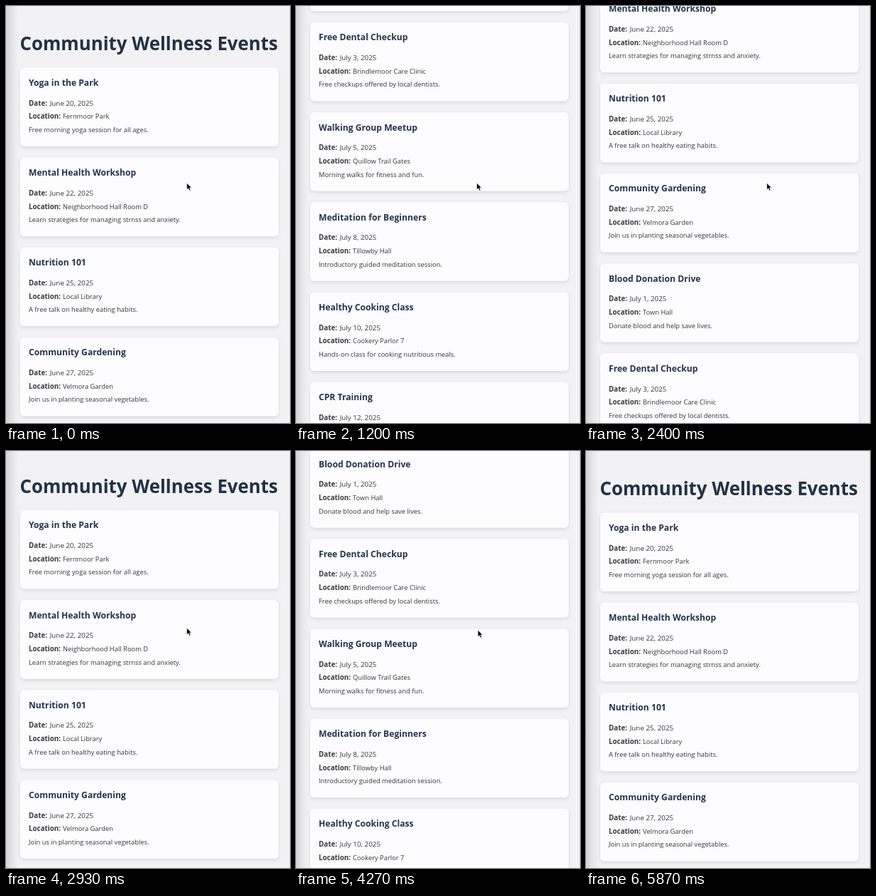
These frames come from a looping animation (400 by 585 pixels, 6470 ms). An HTML page:

```html
<!DOCTYPE html>
<html lang="en">
<head>
<meta charset="utf-8">
<title>Wellness events</title>
<style>
  html, body { margin: 0; width: 100%; height: 100%; overflow: hidden; background: #f2f1f3; }
  svg { display: block; width: 100vw; height: 100vh; }
  text { font: 9.35px "Open Sans", "Noto Sans", sans-serif; fill: #363639; }
  .title { font-size: 25.85px; font-weight: 700; fill: #223245; }
  .heading { font-size: 12.15px; font-weight: 700; fill: #22354b; }
  .label { font-size: 9.8px; font-weight: 700; fill: #3b3b3e; }
  .date { font-size: 9.85px; }
  .card { fill: #fdfcfe; filter: drop-shadow(0 2px 2.5px rgba(0, 0, 0, .1)); }
</style>
</head>
<body>
<svg viewBox="0 0 400 585" preserveAspectRatio="none">
  <defs>
    <linearGradient id="edge">
      <stop offset="0" stop-color="#d3d2d5"/>
      <stop offset=".5" stop-color="#e6e5e8"/>
      <stop offset="1" stop-color="#f2f1f3"/>
    </linearGradient>
  </defs>
  <rect width="400" height="585" fill="#f2f1f3"/>
  <rect width="18" height="585" fill="url(#edge)"/>
  <g id="page"></g>
  <rect x="399" width="1" height="585" fill="#e0dfe2"/>
  <rect id="topLine" width="400" height="1.3" fill="#1d1c20"/>
  <path id="cursor" d="M0 0V9.6L2.2 7.6L3.8 11L5.5 10.2L4 6.9H6.8Z"
        fill="#000" stroke="#fff" stroke-width=".7" stroke-linejoin="round"/>
</svg>
<script>
const LOOP = 6470, STEP = 1000 / 15;
const FIRST_CARD = 86.5, PITCH = 126.15, BOTTOM = 716;

const events = [
  ["Yoga in the Park", "June 20, 2025", "Fernmoor Park", "Free morning yoga session for all ages."],
  ["Mental Health Workshop", "June 22, 2025", "Neighborhood Hall Room D", "Learn strategies for managing strnss and anxiety."],
  ["Nutrition 101", "June 25, 2025", "Local Library", "A free talk on healthy eating habits."],
  ["Community Gardening", "June 27, 2025", "Velmora Garden", "Join us in planting seasonal vegetables."],
  ["Blood Donation Drive", "July 1, 2025", "Town Hall", "Donate blood and help save lives."],
  ["Free Dental Checkup", "July 3, 2025", "Brindlemoor Care Clinic", "Free checkups offered by local dentists."],
  ["Walking Group Meetup", "July 5, 2025", "Quillow Trail Gates", "Morning walks for fitness and fun."],
  ["Meditation for Beginners", "July 8, 2025", "Tillowby Hall", "Introductory guided meditation session."],
  ["Healthy Cooking Class", "July 10, 2025", "Cookery Parlor 7", "Hands-on class for cooking nutritious meals."],
  ["CPR Training", "July 12, 2025", "Rescue Depot #9", ""]
];

const byId = id => document.getElementById(id);
const page = byId("page"), cursor = byId("cursor"), topLine = byId("topLine");

function add(parent, tag, attrs, content = "") {
  const node = document.createElementNS("http://www.w3.org/2000/svg", tag);
  for (const key in attrs) node.setAttribute(key, attrs[key]);
  node.textContent = content;
  return parent.appendChild(node);
}

function addText(parent, x, y, content, style = "") {
  add(parent, "text", { x, y, class: style }, content);
}

addText(page, 19.5, 62, "Community Wellness Events", "title");
events.forEach(([name, date, place, about], i) => {
  const card = add(page, "g", { transform: `translate(20 ${FIRST_CARD + i * PITCH})` });
  add(card, "rect", { width: 364, height: 110.5, rx: 6, class: "card" });
  addText(card, 12, 25.4, name, "heading");
  addText(card, 12, 53.2, "Date:", "label");
  addText(card, 41.7, 53.2, date, "date");
  addText(card, 12, 71.9, "Location:", "label");
  addText(card, 60, 71.9, place);
  addText(card, 12, 90.4, about);
});

// A flick: fast at first, then a long slowing tail.
function flick(t, start, duration, from, to) {
  const p = Math.min(1, Math.max(0, (t - start) / duration));
  return from + (to - from) * (1 - (1 - p) ** 4);
}

function scrollAt(t) {
  if (t < 2130) return flick(t, 58, 1960, 0, BOTTOM);
  if (t < 3400) return flick(t, 2130, 1092, BOTTOM, 0);
  if (t < 3730) return flick(t, 3400, 260, 0, -1.5);
  const down = time => flick(time, 3730, 1500, -1.5, BOTTOM);
  return t < 4670 ? down(t) : flick(t, 4670, 560, down(4670), 0);
}

const show = (node, visible) => node.setAttribute("visibility", visible ? "visible" : "hidden");

function draw(now) {
  const t = Math.floor((now % LOOP + 4) / STEP) * STEP;
  page.setAttribute("transform", `translate(0 ${-scrollAt(t).toFixed(2)})`);
  const nudge = flick(t, 3400, 200, 0, 1);
  cursor.setAttribute("transform", `translate(${254.6 + 1.5 * nudge} ${248.2 + 3 * nudge})`);
  show(cursor, t < 5790);
  show(topLine, t > 3520 && t < 3780);
}

const start = performance.now();
function tick() {
  draw(performance.now() - start);
  requestAnimationFrame(tick);
}
tick();
</script>
</body>
</html>
```
